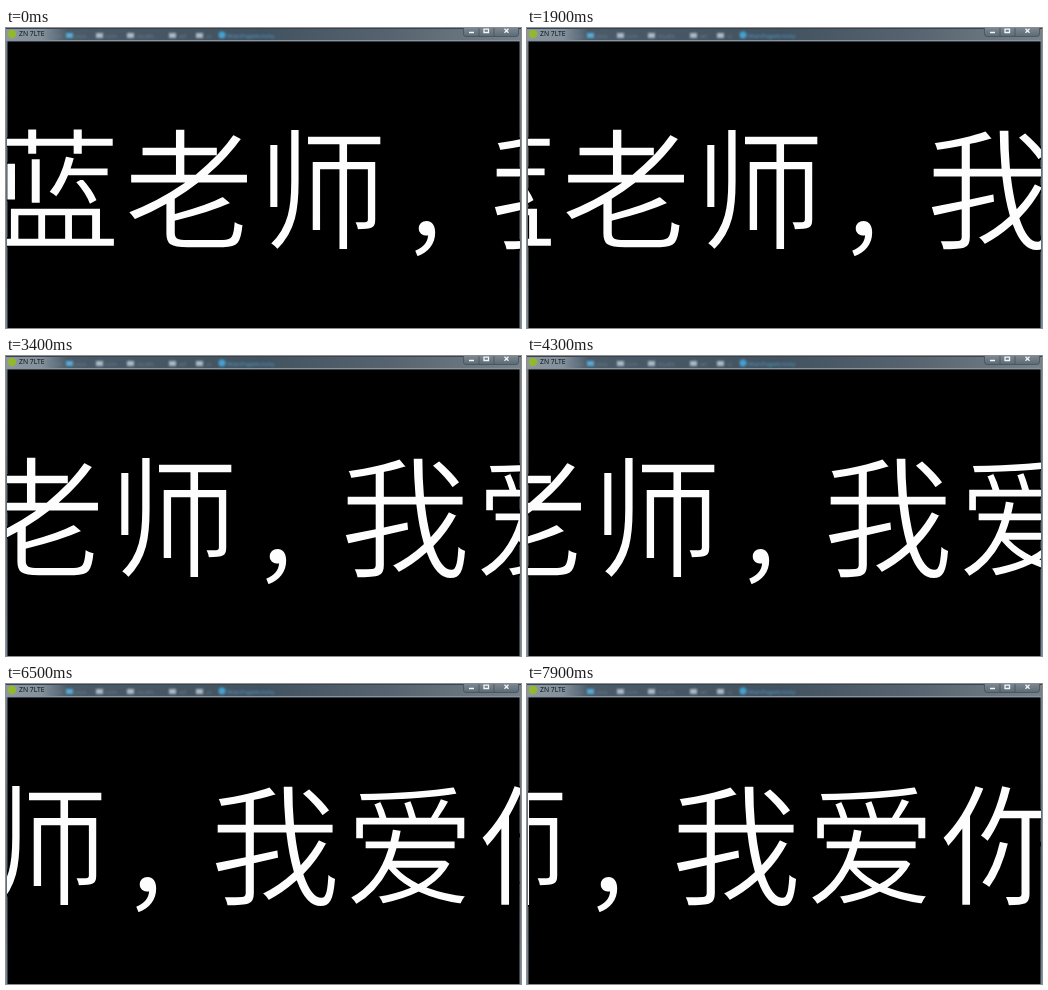
Animation, 515 px wide and 300 px high, one loop 8 s. Source, as an HTML page:

```html
<!DOCTYPE html>
<html lang="zh-CN">
<head>
<meta charset="utf-8">
<style>
  html, body { margin: 0; width: 100%; height: 100%; overflow: hidden; background: #000; }
  svg { display: block; width: 515px; height: 300px; }
  #banner { fill: #fdfdfd; font-family: "Noto Sans CJK SC", "Noto Sans CJK", sans-serif; }
  /* the black outline thins the strokes */
  .han { font-size: 131px; text-anchor: middle; stroke: #000; stroke-width: 1.7px; }
  .comma { font-size: 102px; }
  .title { font: 6.8px "Open Sans", sans-serif; fill: #080c10; }
  .tabs { font: 6px "Open Sans", sans-serif; fill: #6d8090; filter: blur(1.1px); }
</style>
</head>
<body>
<svg viewBox="0 0 515 300">
  <defs>
    <linearGradient id="bar">
      <stop offset="0" stop-color="#8b97a1"/>
      <stop offset=".07" stop-color="#82909b"/>
      <stop offset=".12" stop-color="#4a5a68"/>
      <stop offset=".5" stop-color="#42525f"/>
      <stop offset=".75" stop-color="#57646f"/>
      <stop offset="1" stop-color="#75818b"/>
    </linearGradient>
    <linearGradient id="edge" x2="0" y2="1">
      <stop offset="0" stop-color="#77838d"/>
      <stop offset=".6" stop-color="#606c77"/>
      <stop offset="1" stop-color="#73889b"/>
    </linearGradient>
    <linearGradient id="button" x2="0" y2="1">
      <stop offset="0" stop-color="#7b8790"/>
      <stop offset="1" stop-color="#5c6974"/>
    </linearGradient>
    <clipPath id="screen"><path d="M1 13.5H514V300H1Z"/></clipPath>
  </defs>

  <path fill="url(#edge)" d="M0 0H515V300H0Z"/>
  <path fill="url(#bar)" d="M0 0H515V13H0Z"/>
  <path fill="#39444e" d="M0 0H515V1H0Z"/>
  <path fill="#87939d" d="M1 12H514V13H1Z"/>
  <path d="M1.5 13.5H513.5V300H1.5Z"/>

  <g class="tabs">
    <g fill="#a9bac6">
      <path fill="#58a9d4" d="M60 5h7v5h-7z"/>
      <path d="M90 5h7v5h-7zM121 5h7v5h-7zM163 5h7v5h-7zM190 5h7v5h-7z"/>
      <circle cx="216" cy="7" r="3.5" fill="#45a2d3"/>
    </g>
    <text y="10"><tspan x="42">main</tspan><tspan x="69">java</tspan><tspan x="99">com</tspan><tspan x="131">studio</tspan><tspan x="173">ad</tspan><tspan x="200">ui</tspan></text>
    <text x="221" y="10" fill="#4f9fd0">MainPageActivity</text>
  </g>
  <circle cx="6" cy="6" r="4.2" fill="#94b82d"/>
  <text class="title" x="13" y="7.8">ZN 7LTE</text>

  <path fill="url(#button)" stroke="#404c57" stroke-width=".7" d="M457.5 0V6Q457.5 8.5 460 8.5H510Q512.5 8.5 512.5 6V0M473 0V8.5M488 0V8.5"/>
  <path fill="none" stroke="#f4f7f9" stroke-width="1.3" d="M463 4.5H468M478 1.2H482.5V4.5H478ZM498.5 .8L502.5 4.8M502.5 .8L498.5 4.8"/>

  <g clip-path="url(#screen)">
    <g id="banner">
      <text class="han" x="49 183 316.5" y="210.7">蓝老师</text>
      <text class="comma" x="395.5" y="216.5">，</text>
      <text class="han" x="548 683 818" y="210.7">我爱你</text>
    </g>
  </g>
</svg>
<script>
  const banner = document.getElementById('banner');
  const LOOP = 8000, STEP = 100;
  // [time in ms, distance scrolled]
  const path = [[0, 0], [1200, 52], [2500, 111], [4300, 187], [5500, 238], [6500, 279], [8000, 343]];

  function scrolled(t) {
    const i = path.findIndex(p => p[0] > t);
    const [t0, x0] = path[i - 1], [t1, x1] = path[i];
    return x0 + (x1 - x0) * (t - t0) / (t1 - t0);
  }

  function draw(now) {
    const t = Math.floor((now % LOOP) / STEP) * STEP;
    banner.setAttribute('transform', `translate(${-Math.round(scrolled(t))} 0)`);
    requestAnimationFrame(draw);
  }
  draw(performance.now());
</script>
</body>
</html>
```
